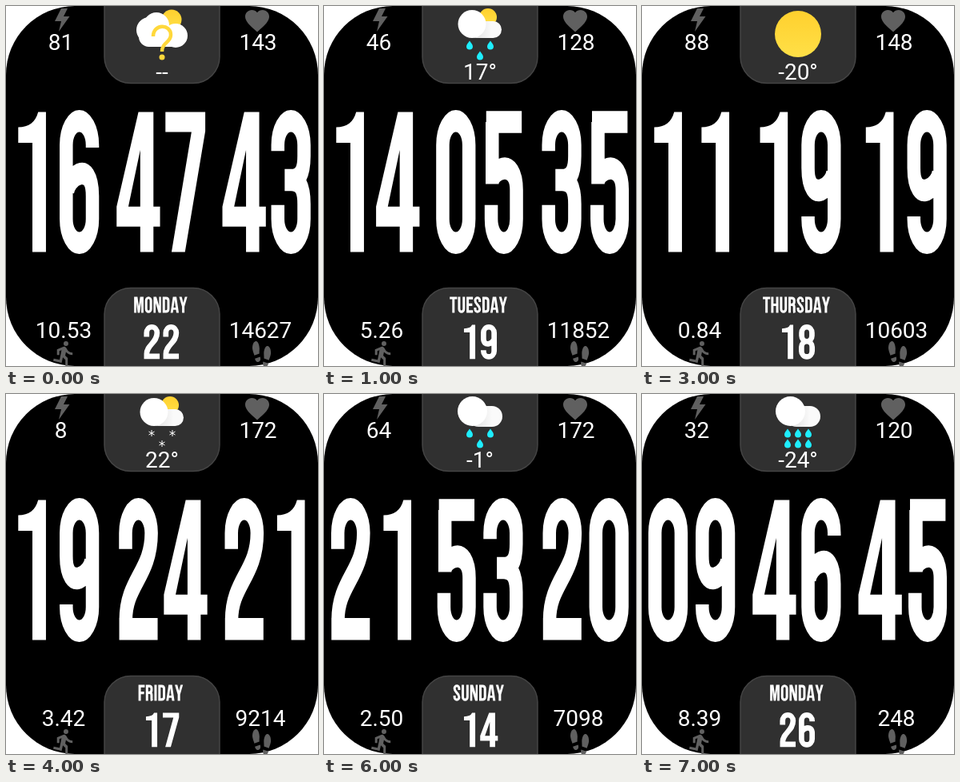
These frames come from a looping animation (390 px wide and 450 px high, 8000 ms). An HTML page:

```html
<!DOCTYPE html>
<html lang="en">
<head>
<meta charset="utf-8">
<title>Watch face</title>
<style>
  html, body { margin: 0; width: 100%; height: 100%; overflow: hidden; background: #fff; }
  svg { display: block; width: 390px; height: 450px; }
  text { font: 28px Roboto, sans-serif; fill: #fff; text-anchor: middle; }
  .panel { fill: #303030; stroke: #444; stroke-width: 1.5; }
  .dim { fill: #606060; }
  .fill { fill: #fff; fill-rule: evenodd; }
  .line { fill: none; stroke: #fff; stroke-width: 110; }
  .state { visibility: hidden; animation: show 8s step-end infinite; }
  @keyframes show {
    0% { visibility: visible; }
    12.5%, 100% { visibility: hidden; }
  }
</style>
</head>
<body>
<svg id="face" viewBox="0 0 390 450">
  <defs>
    <linearGradient id="gold" x1="0" y1="0" x2="0" y2="1">
      <stop offset="0" stop-color="#ffd02e"/><stop offset="1" stop-color="#ffe047"/>
    </linearGradient>
    <linearGradient id="puff">
      <stop offset="0.3" stop-color="#e6e6e6"/><stop offset="0.7" stop-color="#fafafa"/>
    </linearGradient>
    <path id="drop" fill="#1eeeff" d="M0-5.5C1.5-3 4-1 4 1.5A4 4 0 0 1-4 1.5C-4-1-1.5-3 0-5.5Z"/>
    <path id="flake" stroke="#fff" d="M0-4V4M-3.5-2L3.5 2M-3.5 2L3.5-2"/>
    <g id="cloud">
      <rect x="180" y="15" width="43" height="26" rx="13" fill="url(#puff)"/>
      <circle cx="185.500" cy="21.500" r="18.500" fill="#fff"/>
    </g>
    <g id="suncloud">
      <circle cx="205" cy="14" r="11" fill="url(#gold)"/>
      <rect x="180" y="19" width="42" height="21" rx="10.500" fill="url(#puff)"/>
      <circle cx="185" cy="22.500" r="17.500" fill="#fff"/>
    </g>
  </defs>
  <rect width="390" height="450" rx="86"/>
  <path class="panel" d="M123-2V63A33 33 0 0 0 156 96.500H234A33 33 0 0 0 267 63V-2Z"/>
  <path class="panel" d="M123 452V385A33 33 0 0 1 156 352.500H234A33 33 0 0 1 267 385V452Z"/>
  <g class="dim">
    <path d="M69 3L61 19H69L66 32 79.500 13H72L77 3Z"/>
    <path transform="translate(296 .5) scale(1.5)" d="M12 21.350l-1.450-1.320C5.400 15.360 2 12.280 2 8.500 2 5.420 4.420 3 7.500 3c1.740 0 3.410.81 4.500 2.090C13.090 3.810 14.760 3 16.500 3 19.580 3 22 5.420 22 8.500c0 3.780-3.400 6.860-8.550 11.540z"/>
    <path transform="translate(54.700 416.800) scale(1.5)" d="M13.500 5.500a2 2 0 1 0 0-4 2 2 0 0 0 0 4zm-3.600 13.900l1-4.400 2.100 2v6h2v-7.500l-2.100-2 .6-3c1.300 1.500 3.300 2.500 5.500 2.500v-2c-1.900 0-3.500-1-4.300-2.400l-1-1.600c-.4-.6-1-1-1.700-1-.3 0-.5.1-.8.1l-5.200 2.200v4.700h2v-3.400l1.800-.7-1.600 8.100-4.900-1-.4 2z"/>
    <g transform="translate(302.300 415) scale(1.44 2)">
      <path id="foot" d="M10.700 11.700C11.200 13 11.200 14.200 9.750 14.700 6.850 15.800 6.200 13 6.150 12.900ZM5.700 10.900L10 9.800C9.850 8.800 10.100 7.700 10.100 6.500 10.100 4.800 8.800 1.500 6.700 2.050 4.250 2.650 3.900 5.350 4 6.650 4.100 7.950 5.650 10.700 5.700 10.900Z"/>
      <use href="#foot" transform="matrix(-1 0 0 1 24 3)"/>
    </g>
  </g>
</svg>
<script>
// Condensed display face: cap height 700, [advance, path]
const SIX = "M306 178V165A109 120 0 0 0 88 165V535A109 120 0 0 0 306 535V420C306 240 110 310 98 400";
const RING = "M88 165A109 120 0 0 1 306 165V535A109 120 0 0 1 88 535Z";
const lines = {
  0: [394, RING],
  2: [394, "M95 245V165A107 120 0 0 1 309 165C309 370 97 410 97 600V645M42 645H362"],
  3: [394, "M88 195V165A109 120 0 0 1 306 165V220Q306 340 200 340H145M200 340Q306 340 306 460V535A109 120 0 0 1 88 535V465"],
  5: [394, "M352 50H56M106 50V360M106 360V350C118 270 308 235 308 390V535A105 120 0 0 1 98 535V465"],
  6: [394, SIX],
  8: [394, "M92 165A105 120 0 0 1 302 165V225A105 115 0 0 1 92 225ZM88 455A109 115 0 0 1 306 455V535A109 120 0 0 1 88 535Z"],
  9: [394, SIX],
  O: [392, RING],
  D: [394, "M93 55H190Q305 55 305 165V535Q305 645 190 645H93Z"],
  T: [354, "M8 52H346M177 52V700"],
  U: [392, "M88 0V535A108 120 0 0 0 304 535V0"],
  E: [355, "M335 55H91V645H335M91 345H305"],
  F: [340, "M325 55H91V700M91 355H295"],
  H: [410, "M91 0V700M319 0V700M91 350H319"],
  I: [176, "M88 0V700"],
  R: [398, "M91 700V55H190Q302 55 302 160V230Q302 345 190 345H91M205 345Q302 345 302 450V600Q302 660 315 700"],
  S: [378, "M296 225V160A107 115 0 0 0 82 160C82 350 296 350 296 540A107 115 0 0 1 82 540V475"]
};
const fills = {
  1: [394, "M200 700V154H82V76Q215 76 248 0H313V700Z"],
  4: [394, "M217 700V573H20V473L202 0H327V473H382V573H327V700ZM118 473H217V190Z"],
  7: [394, "M33 0H365V96L196 700H84L250 100H33Z"],
  N: [418, "M36 700V0H168L294 400V0H382V700H270L134 270V700Z"],
  M: [506, "M35 700V0H191L253 430 312 0H470V700H366V200L296 700H200L139 215V700Z"],
  A: [406, "M12 700L122 0H284L394 700H283L264 573H137L119 700ZM152 475H249L201 140Z"],
  Y: [388, "M138 700V433L6 0H122L197 260 272 0H382L250 433V700Z"],
  W: [560, "M112 700L12 0H121L184 490 235 0H338L389 490 448 0H548L448 700H322L283 330 238 700Z"]
};

function display(word, x, y, sx, sy = sx, centred = false) {
  let pen = 0, out = "";
  for (const ch of word) {
    const [advance, d] = lines[ch] || fills[ch];
    const turn = ch === "9" ? " rotate(180 197 350)" : "";
    out += `<path class="${lines[ch] ? "line" : "fill"}" transform="translate(${pen})${turn}" d="${d}"/>`;
    pen += advance;
  }
  if (centred) x -= pen * sx / 2;
  return `<g role="img" aria-label="${word}" transform="translate(${x} ${y}) scale(${sx} ${sy})">${out}</g>`;
}

const label = (s, x, y) => `<text x="${x}" y="${y}">${s}</text>`;
const use = (id, x = 0, y = 0) => `<use href="#${id}" x="${x}" y="${y}"/>`;
const trio = id => use(id, 182, 49) + use(id, 208, 49) + use(id, 195, 62);
const shower = [182, 195, 208].map(x => use("drop", x, 49) + use("drop", x, 62)).join("");

const icons = {
  unknown: `<circle cx="207" cy="17" r="12.500" fill="url(#gold)"/>
    <g fill="#fff"><circle cx="179" cy="30" r="16"/><circle cx="188" cy="24" r="16"/>
    <circle cx="212" cy="37" r="15"/><rect x="166" y="26" width="58" height="25" rx="12.500"/></g>
    <path fill="none" stroke="#ffd83b" stroke-width="4.500" d="M184 38C184 22 206 22 206 36 206 46 195 45 195 57"/>
    <circle cx="195" cy="64" r="3.500" fill="#ffd83b"/>`,
  sun: `<circle cx="195" cy="35" r="29" fill="url(#gold)"/>`,
  flurry: use("cloud") + use("flake", 195, 60),
  sunSnow: use("suncloud") + trio("flake"),
  sunRain: use("suncloud") + trio("drop"),
  snow: use("cloud") + trio("flake"),
  rain: use("cloud") + trio("drop"),
  downpour: use("cloud") + shower
};

// time, day, date, battery, pulse, distance, steps, icon, temperature
const states = [
  ["16 47 43", "MONDAY", "22", 81, 143, "10.53", 14627, "unknown", "--"],
  ["14 05 35", "TUESDAY", "19", 46, 128, "5.26", 11852, "sunRain", "17°"],
  ["03 37 28", "WEDNESDAY", "20", 28, 141, "7.11", 13478, "flurry", "--"],
  ["11 19 19", "THURSDAY", "18", 88, 148, "0.84", 10603, "sun", "-20°"],
  ["19 24 21", "FRIDAY", "17", 8, 172, "3.42", 9214, "sunSnow", "22°"],
  ["20 41 33", "SATURDAY", "15", 73, 135, "6.18", 8345, "snow", "-8°"],
  ["21 53 20", "SUNDAY", "14", 64, 172, "2.50", 7098, "rain", "-1°"],
  ["09 46 45", "MONDAY", "26", 32, 120, "8.39", 248, "downpour", "-24°"]
];

const markup = states.map(([time, day, date, battery, pulse, km, steps, icon, temp], i) =>
  `<g class="state" style="animation-delay:${i}s">` +
  time.split(" ").map((pair, k) => display(pair, 3 + 132.25 * k, 132.5, 0.15, 0.25)).join("") +
  display(day, 193, 363.5, 0.027, 0.0285, true) +
  display(date, 194, 398.5, 0.061, 0.061, true) +
  label(battery, 68.5, 55) + label(pulse, 315, 55) +
  label(km, 72, 415) + label(steps, 318, 415) +
  icons[icon] + label(temp, 195, 92) + "</g>"
).join("");
document.getElementById("face").insertAdjacentHTML("beforeend", markup);
</script>
</body>
</html>
```
